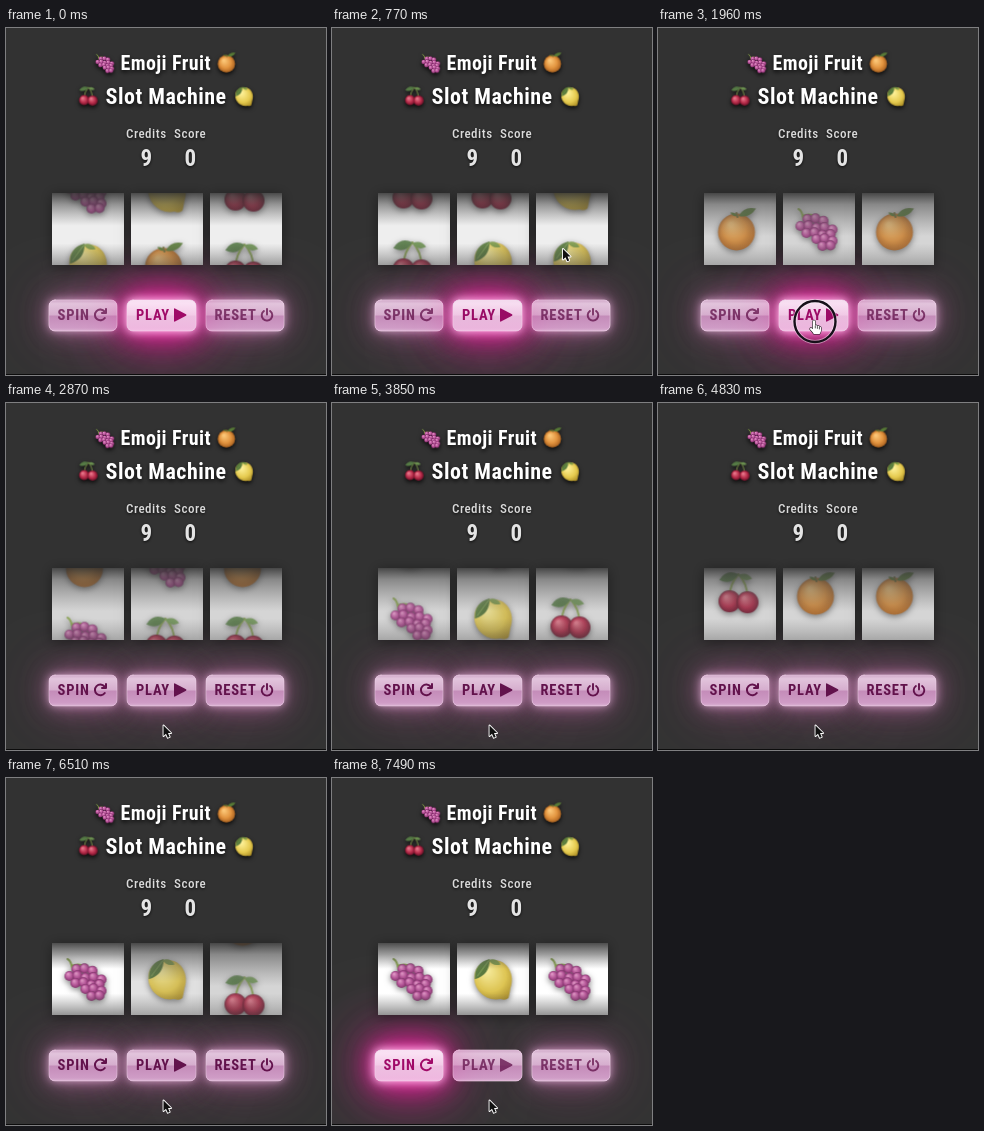
Recreate the animation shown at these times as an HTML page with a canvas. Size 320x347 px, loop 7560 ms.

```html
<!DOCTYPE html>
<html lang="en">
<head>
<meta charset="utf-8">
<title>Emoji Fruit Slot Machine</title>
<style>
html, body { margin: 0; width: 100%; height: 100%; overflow: hidden; background: #323232; }
canvas { display: block; width: 320px; height: 347px; }
</style>
</head>
<body>
<canvas id="stage"></canvas>
<script>
const W = 320, H = 347, LOOP = 7560, STEP = 70, TAU = Math.PI * 2;
const canvas = document.getElementById('stage');
const dpr = window.devicePixelRatio || 1;
canvas.width = W * dpr;
canvas.height = H * dpr;
let ctx = canvas.getContext('2d');

const clamp = v => Math.max(0, Math.min(1, v));
const ramp = (t, a, b) => clamp((t - a) / (b - a));
const smooth = v => v * v * (3 - 2 * v);

// Piecewise linear lookup in [time, value, ...] rows.
function track(rows, t, col = 1) {
  let i = 0;
  while (i < rows.length - 2 && t > rows[i + 1][0]) i++;
  const a = rows[i], b = rows[i + 1];
  return a[col] + (b[col] - a[col]) * ramp(t, a[0], b[0]);
}

function shadow(color, blur = 0, y = 0) {
  ctx.shadowColor = color;
  ctx.shadowBlur = blur * dpr;
  ctx.shadowOffsetY = y * dpr;
}
const noShadow = () => shadow('transparent');

function saved(fn) {
  ctx.save();
  fn();
  ctx.restore();
}

function addStops(g, stops) {
  stops.forEach(([at, color]) => g.addColorStop(at, color));
  return g;
}
const vertical = (y0, y1, stops) => addStops(ctx.createLinearGradient(0, y0, 0, y1), stops);

function round(x, y, r, light, mid, dark) {
  return addStops(ctx.createRadialGradient(x - r * .3, y - r * .4, r * .1, x, y, r),
    [[0, light], [.6, mid], [1, dark]]);
}

function ball(x, y, r, light, mid, dark) {
  ctx.fillStyle = round(x, y, r, light, mid, dark);
  ctx.beginPath();
  ctx.arc(x, y, r, 0, TAU);
  ctx.fill();
}

function leaf(x, y, len, wide, angle, color) {
  saved(() => {
    ctx.translate(x, y);
    ctx.rotate(angle);
    ctx.fillStyle = color;
    ctx.beginPath();
    ctx.moveTo(0, 0);
    ctx.quadraticCurveTo(len / 2, -wide, len, 0);
    ctx.quadraticCurveTo(len / 2, wide, 0, 0);
    ctx.fill();
  });
}

function stroke(path, color, width) {
  ctx.strokeStyle = color;
  ctx.lineWidth = width;
  ctx.lineCap = ctx.lineJoin = 'round';
  ctx.stroke(new Path2D(path));
}

// Each fruit fills roughly 44 x 46 around the origin.
const fruits = {
  G() {
    stroke('M-19 -20 Q-15 -18 -14 -9 M-15 -13 Q-9 -16 -2 -13', '#84a046', 2);
    const rows = [[-10, -10, 3], [-17, -3, 5], [-11, 4, 4], [-1, 10, 3], [5, 17, 2]];
    for (const [x, y, n] of rows)
      for (let i = 0; i < n; i++)
        ball(x + i * 8, y + i * .9 - (i % 2) * 1.5, 5.1, '#e392c6', '#b34c94', '#7f2f68');
  },
  O() {
    ball(-2, 3, 18.5, '#fbc677', '#e39540', '#ad6421');
    leaf(0, -13, 19, 7, -.4, '#587a37');
    leaf(-1, -13, 8, 3, -2.7, '#55782f');
    stroke('M-1 -12 L-2 -16', '#6b6a33', 2);
  },
  C() {
    stroke('M-9 4 Q-9 -9 0 -19 M9 5 Q9 -10 0 -19', '#7d9449', 2);
    leaf(0, -19, 20, 9, 2.85, '#557a45');
    leaf(0, -18, 14, 6, .25, '#6b9150');
    ball(-9, 8, 11, '#e9788c', '#b82c4a', '#6d1229');
    ball(9, 9, 11, '#e9788c', '#b82c4a', '#6d1229');
  },
  L() {
    ctx.fillStyle = round(2, 1, 24, '#fff29a', '#e6cb50', '#a5861f');
    ctx.fill(new Path2D('M1 -19 C16 -20 24 -4 19 9 Q18 15 17 19 Q14 22 9 20 C-6 23 -19 10 -17 -4 C-16 -13 -8 -19 1 -19Z'));
    leaf(-2, -20, 25, 10, 2.2, '#57793a');
    stroke('M-3 -18 L-14 -3', '#86a75b', .9);
    leaf(-3, -19, 13, 5, .35, '#7d9a45');
  }
};

const sprites = {};
function sprite(kind, scale) {
  const c = document.createElement('canvas'), main = ctx, k = scale * dpr;
  c.width = c.height = 60 * k;
  ctx = c.getContext('2d');
  ctx.setTransform(k, 0, 0, k, 30 * k, 30 * k);
  fruits[kind]();
  ctx = main;
  return c;
}

// Drawn from a cached sprite so the drop shadow follows the outline.
function fruit(kind, x, y, scale = 1) {
  const pic = sprites[kind + scale] ??= sprite(kind, scale), size = 60 * scale;
  ctx.drawImage(pic, x - size / 2, y - size / 2, size, size);
}

function text(str, x, y, size, weight, spacing, color) {
  ctx.font = `${weight} ${size}px "Roboto Condensed", Roboto, sans-serif`;
  ctx.fontStretch = 'condensed';
  ctx.letterSpacing = spacing + 'px';
  ctx.fillStyle = color;
  ctx.fillText(str, x, y);
}

function header() {
  saved(() => {
    shadow('rgba(0,0,0,.8)', 4, 2);
    fruit('G', 99, 35, .44);
    fruit('O', 221, 34, .46);
    fruit('C', 82, 68, .46);
    fruit('L', 237, 68, .46);
    text('Emoji Fruit', 114.5, 42, 20, 800, .4, '#fff');
    text('Slot Machine', 99.5, 76, 22, 800, .5, '#fff');
    shadow('rgba(0,0,0,.8)', 3, 1);
    text('Credits', 120, 110, 13, 500, .5, '#dadada');
    text('Score', 168, 110, 13, 500, .5, '#dadada');
    text('9', 134.5, 137.5, 23, 700, 0, '#e4e4e4');
    text('0', 178.5, 137.5, 23, 700, 0, '#e4e4e4');
  });
}

const TOP = 165, SIZE = 72;
const spin = [[0, .48], [770, 3.45], [1960, 8], [3850, 15.2], [4830, 18.85], [6510, 25.24], [7000, 27]];
const reels = [
  { x: 46, strip: 'LGOCCLOGOCLGOLCGOLGCOLCOGL', stop: 24 },
  { x: 125, strip: 'OLGLCOLCGOLCGOCLGCGOCGLOCLG', stop: 25 },
  { x: 204, strip: 'CCGLLOGCOLGCOLGCLGCOGLOCLCOGL', stop: 27 }
];

function reel({ x, strip, stop }, t) {
  const turn = track(spin, t);
  const pos = Math.min(turn, stop);
  const spinning = 1 - ramp(turn, stop + .1, stop + .6);
  const dim = spinning * (.4 + .6 * ramp(t, 900, 1900)) * (1 - ramp(t, 7000, 7140));
  const paper = 255 - 42 * dim;
  saved(() => {
    shadow('rgba(0,0,0,.4)', 12, 2);
    ctx.fillStyle = `rgb(${paper},${paper},${paper})`;
    ctx.fillRect(x, TOP, SIZE, SIZE);
    ctx.beginPath();
    ctx.rect(x, TOP, SIZE, SIZE);
    ctx.clip();
    shadow('rgba(0,0,0,.55)', 6, 2);
    ctx.globalAlpha = .92 - .12 * dim;
    const first = Math.floor(pos) - 1;
    for (let k = Math.max(0, first); k <= first + 3; k++)
      if (strip[k]) fruit(strip[k], x + 34.5, 201 + SIZE * (pos - k));
    ctx.globalAlpha = 1;
    noShadow();
    ctx.fillStyle = vertical(TOP, TOP + SIZE, [
      [0, 'rgba(45,45,45,.85)'],
      [.16, 'rgba(60,60,60,.5)'],
      [.36 + .24 * dim, 'rgba(90,90,90,0)'],
      [.7, 'rgba(90,90,90,0)'],
      [1, `rgba(60,60,60,${.55 - .25 * dim})`]
    ]);
    ctx.fillRect(x, TOP, SIZE, SIZE);
  });
}

const icons = {
  redo: 'M98.5 283.5 A5.4 5.4 0 1 0 98.8 290 M100 281 V285 H96',
  power: 'M257.9 283 A5.3 5.3 0 1 0 264.1 283 M261 281 V286.5'
};
const buttons = [
  { x: 43, w: 68, label: 'SPIN', tx: 51.5, icon: c => stroke(icons.redo, c, 2) },
  { x: 121, w: 69, label: 'PLAY', tx: 130, icon: c => {
    ctx.fillStyle = c;
    ctx.fill(new Path2D('M168 281 Q168 280 169 280.5 L180 286.2 Q181 287 180 287.8 L169 293.5 Q168 294 168 293Z'));
  } },
  { x: 200, w: 78, label: 'RESET', tx: 208.5, icon: c => stroke(icons.power, c, 1.9) }
];

function box(b) {
  ctx.beginPath();
  ctx.roundRect(b.x, 272, b.w, 31, 6);
}

function halo(b, layers) {
  saved(() => {
    ctx.fillStyle = '#c79bc0';
    for (const [color, blur] of layers) {
      shadow(color, blur);
      box(b);
      ctx.fill();
    }
  });
}

const softGlow = a => [
  [`rgba(150,50,115,${.65 * a})`, 56],
  [`rgba(205,120,180,${.7 * a})`, 24],
  [`rgba(245,195,235,${.7 * a})`, 9]
];
const hotGlow = a => [
  [`rgba(235,30,150,${.8 * a})`, 84],
  [`rgba(230,0,140,${a})`, 52],
  [`rgba(240,20,155,${a})`, 28],
  [`rgba(255,215,245,${a})`, 11]
];

function button(b, lit) {
  box(b);
  ctx.fillStyle = vertical(272, 303, [
    [0, '#d0a8c8'], [.12, '#e2c4dc'], [.48, '#d6aece'], [.52, '#c48cb9'], [.9, '#cf9cc6'], [1, '#dbb3d3']
  ]);
  ctx.fill();
  if (lit > 0) {
    ctx.fillStyle = vertical(272, 303, [
      [0, `rgba(255,235,250,${.85 * lit})`], [.5, `rgba(255,215,242,${.7 * lit})`], [1, `rgba(255,195,236,${.65 * lit})`]
    ]);
    ctx.fill();
  }
  ctx.strokeStyle = 'rgba(245,222,241,.4)';
  ctx.lineWidth = 1;
  ctx.stroke();
  const ink = `rgb(${98 + 62 * lit},${18 - 8 * lit},${76 + 28 * lit})`;
  text(b.label, b.tx, 292, 14.5, 700, .8, ink);
  b.icon(ink);
}

function controls(t) {
  const pulse = .94 + .06 * Math.cos(t / 1540 * TAU);
  const start = smooth(ramp(t, 6930, 7420));
  const lits = [start, pulse * (1 - ramp(t, 1990, 2320)), 0];
  buttons.forEach((b, i) => halo(b, softGlow(i === 1 ? 1 - start : 1)));
  buttons.forEach((b, i) => button(b, lits[i]));
  // A lit button casts its light over its neighbours.
  buttons.forEach((b, i) => {
    if (lits[i] <= 0) return;
    saved(() => {
      ctx.globalAlpha = lits[i];
      halo(b, hotGlow(1));
    });
    button(b, lits[i]);
  });
}

// The lit halo is softened over the other buttons by redrawing them thinly.
function neighbours(t) {
  const lit = t < 2320 ? 1 : t > 6930 ? 0 : -1;
  if (lit < 0) return;
  saved(() => {
    ctx.globalAlpha = .65;
    buttons.forEach((b, i) => { if (i !== lit) button(b, 0); });
  });
}

const path = [
  [350, 322, 176], [560, 276, 196], [770, 231, 221], [1120, 190, 262],
  [1470, 156, 293], [2240, 156, 293], [2590, 157.5, 322.5], [7560, 157.5, 322.5]
];

function pointer(t) {
  if (t < 350) return;
  const x = track(path, t), y = track(path, t, 2);
  const hand = t >= 1400 && t < 2380;
  if (t >= 1820 && t < 2170) {
    ctx.lineWidth = 4;
    ctx.strokeStyle = 'rgba(255,255,255,.45)';
    ctx.beginPath();
    ctx.arc(157, 293.5, 20.5, 0, TAU);
    ctx.stroke();
    ctx.lineWidth = 2.4;
    ctx.strokeStyle = '#17101a';
    ctx.stroke();
  }
  saved(() => {
    ctx.translate(x, y);
    const shape = new Path2D(hand
      ? 'M-1.2 0 Q0 -1.4 1.2 0 V4.5 Q2.8 3.6 3.3 5 Q5 4.3 5.4 5.8 Q7 5.4 7.1 7.2 V9.5 Q6.8 11 5.6 13 H-.2 Q-1.6 10.7 -4 8.3 Q-4.2 6.5 -2.6 7 L-1.2 8.2Z'
      : 'M0 0 V10.6 L2.5 8.3 L4.3 12.3 L6.2 11.4 L4.5 7.6 H7.6Z');
    ctx.lineJoin = 'round';
    ctx.fillStyle = hand ? '#fff' : '#111';
    ctx.strokeStyle = hand ? '#111' : '#fff';
    ctx.lineWidth = hand ? 1.1 : 1.8;
    ctx.stroke(shape);
    ctx.fill(shape);
    if (hand) stroke('M1.3 5 V7 M3.4 5.5 V7.4 M5.4 6.3 V8', '#111', .7);
  });
}

function draw(t) {
  ctx.setTransform(dpr, 0, 0, dpr, 0, 0);
  noShadow();
  ctx.fillStyle = '#323232';
  ctx.fillRect(0, 0, W, H);
  header();
  controls(t);
  neighbours(t);
  reels.forEach(r => reel(r, t));
  pointer(t);
  ctx.fillStyle = '#0c0c0c';
  ctx.fillRect(0, 346, W, 1);
}

const begin = performance.now();
function tick() {
  const t = (performance.now() - begin) % LOOP;
  draw(Math.floor(t / STEP) * STEP);
  requestAnimationFrame(tick);
}
tick();
</script>
</body>
</html>
```
